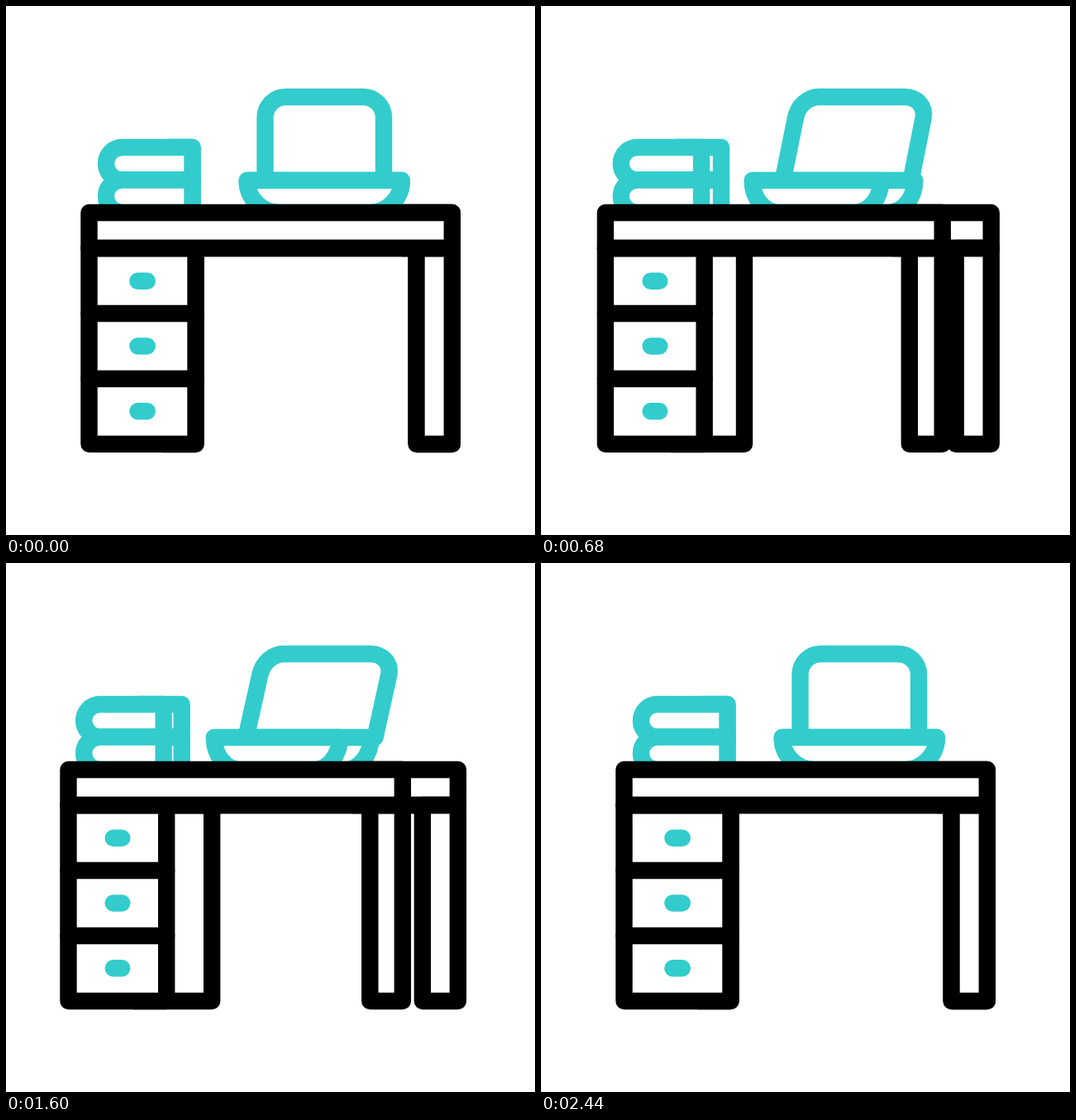
Recreate the animation shown at these times as an HTML page with a canvas. Size 640 px wide and 640 px high, loop 2640 ms.

```html
<!DOCTYPE html>
<html lang="en">
<head>
<meta charset="utf-8">
<title>Desk</title>
<style>
html, body { margin: 0; width: 100%; height: 100%; overflow: hidden; background: #fff; }
canvas { display: block; width: 100vw; height: 100vh; }
</style>
</head>
<body>
<canvas id="stage" width="640" height="640"></canvas>
<script>
const ctx = document.getElementById('stage').getContext('2d');
const LOOP = 2640, STEP = 40, TEAL = '#33cccc', BLACK = '#000';

const clamp = v => Math.max(0, Math.min(1, v));
const mix = (a, b, k) => a + (b - a) * k;

// Cubic Bezier easing through (x1, 0) and (x2, 1), solved by bisection.
function ease(u, x1 = 0.6, x2 = 0.05) {
  u = clamp(u);
  let lo = 0, hi = 1;
  for (let i = 0; i < 24; i++) {
    const s = (lo + hi) / 2, r = 1 - s;
    if (3 * s * r * r * x1 + 3 * s * s * r * x2 + s * s * s < u) lo = s;
    else hi = s;
  }
  return lo * lo * (3 - 2 * lo);
}

// Rises from 200 ms, falls again from the given time.
const turn = (t, back) => ease((t - 200) / 1000) - ease((t - back) / 1000);

function paint(color, build, fill) {
  ctx.beginPath();
  build();
  if (fill) {
    ctx.fillStyle = '#fff';
    ctx.fill();
  }
  ctx.strokeStyle = color;
  ctx.stroke();
}

const box = (x0, y0, x1, y1) =>
  paint(BLACK, () => ctx.rect(x0, y0, x1 - x0, y1 - y0), true);

const line = (color, x0, y0, x1, y1) => paint(color, () => {
  ctx.moveTo(x0, y0);
  ctx.lineTo(x1, y1);
});

function bowl(x0, x1) {
  const rx = 39 * (x1 - x0) / 187;
  paint(TEAL, () => {
    ctx.moveTo(x1, 211);
    ctx.ellipse(x1 - rx, 211, rx, 39, 0, 0, Math.PI / 2);
    ctx.ellipse(x0 + rx, 211, rx, 39, 0, Math.PI / 2, Math.PI);
    ctx.closePath();
  }, true);
}

function screen(q) {
  const m = (a, b) => mix(a, b, q);
  paint(TEAL, () => {
    ctx.moveTo(m(313.5, 287), 211);
    ctx.lineTo(m(313.5, 306.5), 135);
    ctx.bezierCurveTo(m(313.5, 310), 121, m(324.7, 322), 110, m(338.5, 336), 110);
    ctx.lineTo(m(432, 442), 110);
    ctx.bezierCurveTo(m(445.8, 457), 110, m(457, 467.5), 121, m(457, 464), m(135, 136));
    ctx.lineTo(m(457, 445), 211);
  });
}

function book(left, right, top) {
  const r = 19.75;
  paint(TEAL, () => {
    ctx.moveTo(right, top);
    ctx.lineTo(left + r, top);
    ctx.arc(left + r, top + r, r, -Math.PI / 2, Math.PI / 2, true);
    ctx.lineTo(right, top + 2 * r);
    ctx.closePath();
  }, true);
}

function books(q, e) {
  const left = mix(121, 90.2, q), right = mix(225.5, 185.5, q);
  for (const top of [171, 210.5]) {
    paint(TEAL, () => ctx.rect(right - 30, top, 30 + 30.5 * e, 39.5));
  }
  for (const top of [171, 210.5]) book(left, right, top);
}

function laptop(q, e) {
  const x0 = mix(291.7, 245.8, q), x1 = mix(478.8, 393, q);
  screen(q);
  bowl(x0 + 52 * e, x1 + 52 * e);
  bowl(x0, x1);
}

function cross(k) {
  if (k < 0.01) return;
  ctx.save();
  ctx.translate(363.6, 164);
  ctx.scale(k, k);
  line(BLACK, 0, -17, 0, 17.5);
  line(BLACK, -16, 0, 16, 0);
  ctx.restore();
}

function desk(q, d) {
  const left = mix(100.5, 71.8, q), right = mix(539.8, 471, q);
  const inner = mix(229.5, 189, q), leg = mix(496.5, 432, q);
  const back = right + 75 * d;
  box(right - 60, 250, back, 293);
  box(back - 43, 293, back, 530);
  box(inner - 40, 293, inner + 61.5 * d, 530);
  box(leg, 293, right, 530);
  box(left, 293, inner, 530);
  box(left, 250, right, 293);
  line(BLACK, left, 293, back, 293);
  for (const y of [372, 451]) line(BLACK, left, y, inner, y);
  const x = mix(159.4, 125.4, q), w = mix(11.4, 10.4, q);
  for (const y of [332.7, 411.5, 490.2]) line(TEAL, x, y, x + w, y);
}

function draw(t) {
  const q = turn(t, 1340), e = turn(t, 1280), d = turn(t, 1355);
  ctx.fillStyle = '#fff';
  ctx.fillRect(0, 0, 640, 640);
  ctx.lineWidth = 20.4;
  ctx.lineCap = ctx.lineJoin = 'round';
  books(q, e);
  laptop(q, e);
  cross(ease((t - 1040) / 260, 0.4, 0.4) - ease((t - 1340) / 220, 0.4, 0.4));
  desk(q, d);
}

const start = performance.now();
function tick() {
  const t = (performance.now() - start) % LOOP;
  draw(Math.floor(t / STEP) * STEP);
  requestAnimationFrame(tick);
}
tick();
</script>
</body>
</html>
```
